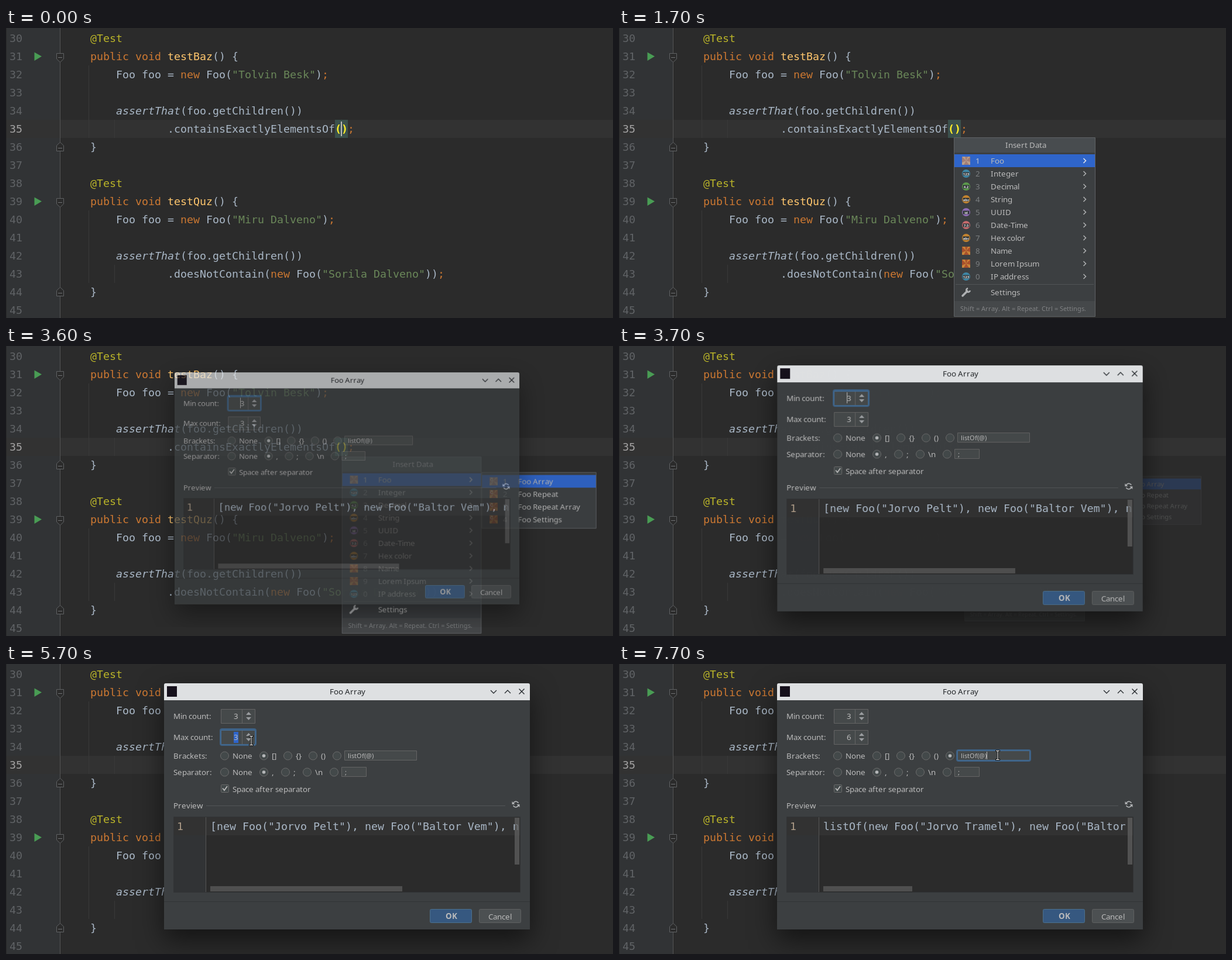
These frames come from a looping animation (1037x496 px, 8 s). An HTML page with a canvas:

```html
<!DOCTYPE html>
<html lang="en">
<head>
<meta charset="utf-8">
<title>Insert data</title>
<style>
  html, body { margin: 0; width: 100%; height: 100%; overflow: hidden; background: #2b2b2b; }
  canvas { display: block; width: 1037px; height: 496px; }
</style>
</head>
<body>
<canvas id="stage" width="1037" height="496"></canvas>
<script>
const W = 1037, H = 496, LOOP = 8000, STEP = 100;
const stage = document.getElementById('stage').getContext('2d');
const sheet = document.createElement('canvas');
sheet.width = W;
sheet.height = H;
const sheetCtx = sheet.getContext('2d');
let g = stage;

const MONO = '18.27px "DejaVu Sans Mono", monospace';
const UI = '13.33px "Noto Sans", sans-serif';
const SMALL = '11px "Noto Sans", sans-serif';
const CELL = 11, ROW = 31, CODE_X = 100;
const TEXT = '#a9b7c6', LABEL = '#bbbbbb', PANEL = '#3c3f41', BLUE = '#2f65ca';

const CODE = [
  '    @Test',
  '    public void testBaz() {',
  '        Foo foo = new Foo("Tolvin Besk");',
  '',
  '        assertThat(foo.getChildren())',
  '                .containsExactlyElementsOf  ;',
  '    }',
  '',
  '    @Test',
  '    public void testQuz() {',
  '        Foo foo = new Foo("Miru Dalveno");',
  '',
  '        assertThat(foo.getChildren())',
  '                .doesNotContain(new Foo("Sorila Dalveno"));',
  '    }',
  ''
];

const MENU = [
  ['Foo', 'tile'], ['Integer', '#3f87a6', '123'], ['Decimal', '#5c9a4c', '4.2'],
  ['String', '#c4842f', 'abc'], ['UUID', '#8f6cb5', 'id'], ['Date-Time', '#c66a6c', '7:3'],
  ['Hex color', '#c4842f', 'abc'], ['Name', 'tile'], ['Lorem Ipsum', 'tile'], ['IP address', '#3f87a6', '123']
];
const SUBMENU = ['Foo Array', 'Foo Repeat', 'Foo Repeat Array', 'Foo Settings'];

const PREVIEWS = {
  three: '[new Foo("Jorvo Pelt"), new Foo("Baltor Vem"), n',
  six: '[new Foo("Jorvo Tramel"), new Foo("Baltor Quemen',
  list: 'listOf(new Foo("Jorvo Tramel"), new Foo("Baltor'
};

// Pointer keys: time, x, y
const POINTER = [
  [4100, 616, 234], [4200, 611, 194], [4300, 600, 149], [4600, 492, 124], [4900, 416, 116],
  [5100, 408, 125], [5300, 419, 131], [6400, 419, 131], [6700, 480, 140], [7100, 610, 153],
  [7400, 642, 157], [7600, 647, 156]
];

const clamp = v => Math.min(1, Math.max(0, v));
const easeOut = p => 1 - (1 - p) ** 3;
const progress = (t, start) => clamp((t - start) / 200);

function rect(x, y, w, h, fill) {
  g.fillStyle = fill;
  g.fillRect(x, y, w, h);
}

function box(x, y, w, h, fill, border, r = 0, line = 1) {
  g.beginPath();
  g.roundRect(x + line / 2, y + line / 2, w - line, h - line, r);
  g.fillStyle = fill;
  g.fill();
  g.strokeStyle = border;
  g.lineWidth = line;
  g.stroke();
}

function path(points, stroke, line = 1, fill) {
  g.beginPath();
  for (let i = 0; i < points.length; i += 2) g.lineTo(points[i], points[i + 1]);
  if (fill) {
    g.closePath();
    g.fillStyle = fill;
    g.fill();
  }
  if (stroke) {
    g.strokeStyle = stroke;
    g.lineWidth = line;
    g.stroke();
  }
}

function disc(x, y, r, fill) {
  g.beginPath();
  g.arc(x, y, r, 0, 7);
  g.fillStyle = fill;
  g.fill();
}

// Interface text sits on whole-pixel advances
function label(text, x, y, color = LABEL, font = UI) {
  g.font = font;
  g.fillStyle = color;
  for (const ch of text) {
    g.fillText(ch, x, y);
    x += Math.round(g.measureText(ch).width);
  }
}

function mono(text, x, y, color, style = '') {
  g.font = style + MONO;
  g.fillStyle = color;
  g.fillText(text, x, y);
}

function tokenStyle(token) {
  if (token[0] === '@') return ['#bbb529'];
  if (token[0] === '"') return ['#6a8759'];
  if (/^(public|void|new|;)$/.test(token)) return ['#cc7832'];
  if (token.startsWith('test')) return ['#ffc66d'];
  return [TEXT, token === 'assertThat' ? 'italic ' : ''];
}

function foldMark(cy, dir) {
  const tip = cy + 8 * dir, side = cy + 2.5 * dir, end = cy - 7 * dir;
  path([86.5, end, 98.5, end, 98.5, side, 92.5, tip, 86.5, side, 86.5, end], '#606264', 1, '#2b2b2b');
  rect(89, Math.round(cy - dir), 7, 1, '#707274');
}

function editor(t) {
  rect(0, 0, W, H, '#2b2b2b');
  rect(0, 0, 92, H, '#313335');
  rect(0, 157, W, ROW, '#323232');
  rect(0, 0, 1, H, '#282828');
  rect(92, 0, 1, H, '#555555');
  for (const y of [64, 312]) {
    rect(141, y, 1, 124, '#393939');
    rect(185, y + 93, 1, ROW, '#393939');
  }
  CODE.forEach((line, i) => {
    const y = 24 + i * ROW;
    mono(String(30 + i), 6, y, i === 5 ? '#a4a3a3' : '#606366');
    for (const m of line.matchAll(/@\w+|"[^"]*"|\w+|[^\w@"\s]/g)) {
      mono(m[0], CODE_X + m.index * CELL, y, ...tokenStyle(m[0]));
    }
    if (line.includes('void')) {
      path([48.5, y - 13.5, 61, y - 6.5, 48.5, y + 1], null, 1, '#499c54');
      foldMark(y - 4.5, 1);
    }
    if (line.trim() === '}') foldMark(y - 6.5, -1);
  });
  rect(562, 157, 22, ROW, '#3b514d');
  mono('()', 562, 179, '#ffef28', 'bold ');
  if (t < 200 || (t >= 700 && t < 1200)) rect(572, 160, 2, 25, '#bbbbbb');
}

function tile(x, y, selected, badge) {
  rect(x - 7, y - 7, 14, 14, selected ? '#b9a08c' : '#c8853a');
  const dark = selected ? '#a37d75' : '#a8502c';
  path([x - 7, y - 7, x, y, x - 7, y + 3], null, 1, dark);
  path([x, y, x + 7, y - 7, x + 7, y + 2], null, 1, dark);
  path([x, y, x + 5, y + 7, x - 4, y + 7], null, 1, dark);
  path([x - 2, y - 7, x + 3, y - 7, x, y], null, 1, dark);
  if (badge) {
    g.beginPath();
    g.arc(x - 3, y - 3, 2.5, 0.5, 5.5);
    g.strokeStyle = '#e0d6cc';
    g.lineWidth = 1;
    g.stroke();
  }
}

function badgeIcon(x, y, color, text) {
  disc(x, y, 7, color);
  rect(x - 5.5, y - 2.5, 11, 6, '#2f3437');
  g.textAlign = 'center';
  g.font = 'bold 6px "Noto Sans", sans-serif';
  g.fillStyle = '#f0f0f0';
  g.fillText(text, x, y + 2.5);
  g.textAlign = 'left';
}

function wrench(x, y) {
  g.lineCap = 'round';
  path([x - 6, y + 6, x + 2, y - 2], '#afb1b3', 3.5);
  g.lineCap = 'butt';
  g.beginPath();
  g.arc(x + 3.5, y - 3.5, 3.2, 0.1, 4.6);
  g.strokeStyle = '#afb1b3';
  g.lineWidth = 2.6;
  g.stroke();
}

function menu() {
  box(572, 187, 242, 307, PANEL, '#5f6265');
  rect(573, 188, 240, 25, '#484c4f');
  label('Insert Data', 660, 205);
  rect(573, 216, 240, 22, BLUE);
  MENU.forEach(([name, icon, text], i) => {
    const y = 227 + i * 22;
    if (icon === 'tile') tile(593, y, i === 0);
    else badgeIcon(593, y, icon, text);
    label(String((i + 1) % 10), 609, y + 5, i ? '#7b7e80' : '#c0c4cc');
    label(name, 635, y + 5);
    path([793.5, y - 4, 797.5, y, 793.5, y + 4], i ? '#afb1b3' : '#e6e8ec', 1.5);
  });
  rect(575, 438, 236, 1, '#515456');
  wrench(593, 452);
  label('Settings', 635, 457);
  rect(573, 467, 240, 26, '#45484a');
  label('Shift = Array. Alt = Repeat. Ctrl = Settings.', 583, 484, '#808284', SMALL);
}

function submenu() {
  box(811, 215, 199, 98, PANEL, '#5f6265');
  rect(812, 220, 197, 22, BLUE);
  SUBMENU.forEach((name, i) => {
    const y = 231 + i * 22;
    tile(832, y, i === 0, true);
    label(String(i + 1), 848, y + 5, i ? '#7b7e80' : '#c0c4cc');
    label(name, 874, y + 5);
  });
}

function spinner(y, value, focused, selected, caretX) {
  if (focused) box(365, y - 3, 63, 30, '#3d6185', '#3d6185', 3);
  box(367, y, 59, 25, '#45494a', focused ? '#466d94' : '#646464');
  rect(403, y + 1, 1, 23, '#646464');
  path([410, y + 10, 414.5, y + 5, 419, y + 10], null, 1, '#9a9da0');
  path([410, y + 14, 414.5, y + 19, 419, y + 14], null, 1, '#9a9da0');
  if (selected) rect(389, y + 3, 8, 19, BLUE);
  label(value, 389, y + 17);
  if (caretX) rect(caretX, y + 2, 1, 19, '#bbbbbb');
}

function radio(x, y, on) {
  box(x - 7.5, y - 7.5, 15, 15, '#43494a', '#6b6b6b', 7);
  if (on) disc(x, y, 2.8, '#b4b6b8');
}

function radioRow(y, xs, texts, chosen) {
  xs.forEach((x, i) => {
    radio(x, y, i === chosen);
    if (texts[i]) label(texts[i], x + 13.5, y + 5);
  });
}

function refreshIcon(x, y) {
  g.strokeStyle = '#afb1b3';
  g.lineWidth = 1.7;
  for (const a of [0, Math.PI]) {
    g.beginPath();
    g.arc(x, y, 4.8, a + 0.35, a + 2.7);
    g.stroke();
  }
  path([x - 6.5, y - 5, x - 6.5, y, x - 1.5, y], null, 1, '#afb1b3');
  path([x + 6.5, y + 5, x + 6.5, y, x + 1.5, y], null, 1, '#afb1b3');
}

function preview(text, thumb) {
  box(286, 261, 593, 130, '#2b2b2b', '#323436');
  rect(287, 262, 54, 128, '#313335');
  rect(287, 262, 591, ROW, '#323232');
  rect(341, 262, 1, 128, '#555555');
  mono('1', 292, 284, '#ad9b87');
  g.save();
  g.beginPath();
  g.rect(342, 262, 536, 128);
  g.clip();
  mono(text, 349, 284, TEXT);
  g.restore();
  rect(869, 263, 8, 80, 'rgba(95,95,95,.75)');
  rect(349, 380, thumb, 9, '#4f4f4f');
}

function titleBar() {
  g.beginPath();
  g.roundRect(270, 33, 625, 29, [3, 3, 0, 0]);
  g.fillStyle = '#dee0e2';
  g.fill();
  rect(275, 38, 17, 18, '#16111c');
  label('Foo Array', 553, 52, '#232629');
  const ink = '#2b2f33';
  path([828, 45, 833, 50, 838, 45], ink, 1.4);
  path([852, 50, 857, 45, 862, 50], ink, 1.4);
  path([876.5, 42.5, 885.5, 51.5], ink, 1.4);
  path([885.5, 42.5, 876.5, 51.5], ink, 1.4);
}

function dialog(t) {
  const minFocus = t < 5200, maxFocus = !minFocus && t < 7300, listFocus = t >= 7300;
  const typed = t >= 6200, listMode = t >= 7400;
  const minCaret = minFocus && (t < 4100 || (t >= 4600 && t < 5100));
  const maxCaret = maxFocus && (t < 5700 || (typed && t < 6700) || t >= 7200);

  g.save();
  g.shadowColor = 'rgba(0,0,0,.55)';
  g.shadowBlur = 45;
  g.shadowOffsetY = 18;
  g.beginPath();
  g.roundRect(270, 33, 625, 421, [3, 3, 0, 0]);
  g.fillStyle = PANEL;
  g.fill();
  g.restore();
  titleBar();

  label('Min count:', 286, 94);
  label('Max count:', 286, 130);
  label('Brackets:', 286, 162);
  label('Separator:', 286, 190);
  spinner(77, '3', minFocus, false, minCaret && 389);
  spinner(113, typed ? '6' : '3', maxFocus, maxFocus && !typed, maxCaret && 397);

  radioRow(157, [373.5, 440.5, 481.5, 524.5, 565.5], ['None', '[]', '{}', '()'], listMode ? 4 : 1);
  if (listFocus) box(576, 146, 128, 21, '#3d6185', '#3d6185', 3);
  box(578, 148, 124, 17, '#45494a', listFocus ? '#466d94' : '#646464');
  label('listOf(@)', 584, 161, LABEL, SMALL);
  if (t >= 7500) rect(628, 150, 1, 13, '#bbbbbb');

  radioRow(185, [373.5, 440.5, 477.5, 514.5, 560.5], ['None', ',', ';', '\\n'], 1);
  box(573, 176, 43, 17, '#45494a', '#646464');
  label(';', 579, 189, LABEL, SMALL);

  box(367, 206, 14, 14, '#43494a', '#6b6b6b', 1);
  path([370, 212.5, 373, 216, 378, 209], '#bbbbbb', 1.8);
  label('Space after separator', 387, 219);

  label('Preview', 286, 247);
  rect(342, 242, 511, 1, '#515456');
  refreshIcon(871, 240);
  preview(PREVIEWS[listMode ? 'list' : listFocus ? 'six' : 'three'], listFocus ? 152 : 328);

  rect(270, 406, 625, 1, '#323537');
  box(724, 419, 72, 24, '#365880', '#4c708c', 2);
  label('OK', 751, 436, LABEL, 'bold ' + UI);
  box(808, 419, 72, 24, '#4c5052', '#5e6060', 2);
  label('Cancel', 824, 437);
}

function pointerAt(t) {
  const i = POINTER.findIndex(k => k[0] > t);
  if (i < 0) return POINTER.at(-1).slice(1);
  const [t0, x0, y0] = POINTER[i - 1], [t1, x1, y1] = POINTER[i];
  const p = (t - t0) / (t1 - t0);
  return [x0 + (x1 - x0) * p, y0 + (y1 - y0) * p];
}

function pointer(t) {
  const [px, py] = pointerAt(t);
  const x = Math.round(px), y = Math.round(py);
  const inList = x >= 578 && x < 702 && y >= 149 && y < 165 && t > 7000;
  if (inList || (t >= 5000 && t < 6200)) {
    const beam = [[-4, -9, 8, 3], [-4, 6, 8, 3], [-1.5, -9, 3, 18]];
    for (const [dx, dy, w, h] of beam) rect(x + dx, y + dy, w, h, '#111111');
    rect(x - 3, y - 8, 6, 1, '#ffffff');
    rect(x - 3, y + 7, 6, 1, '#ffffff');
    rect(x - 0.5, y - 8, 1, 16, '#ffffff');
    return;
  }
  const outline = [0, 0, 0, 16, 4, 13, 7, 19, 9.5, 18, 7, 12, 11, 11.5, 0, 0];
  path(outline.map((v, i) => v + (i % 2 ? y : x) + 0.5), '#ffffff', 1.2, '#17191b');
}

// Draws a window as one sheet, then fades and scales it about its centre
function windowLayer(draw, cx, cy, amount) {
  if (amount <= 0) return;
  g = sheetCtx;
  g.clearRect(0, 0, W, H);
  draw();
  g = stage;
  const scale = 0.8 + 0.2 * amount;
  g.save();
  g.globalAlpha = amount;
  g.translate(cx, cy);
  g.scale(scale, scale);
  g.drawImage(sheet, -cx, -cy);
  g.restore();
}

function render(t) {
  editor(t);
  const closing = 1 - progress(t, 3518) ** 3;
  const opened = start => t < 3600 ? easeOut(progress(t, start)) : closing;
  windowLayer(menu, 693, 340.5, opened(1432));
  windowLayer(submenu, 910.5, 264, opened(2532));
  if (t >= 3600) windowLayer(() => dialog(t), 582.5, 243.5, easeOut(progress(t, 3532)));
  if (t >= 4100) pointer(t);
}

const begin = performance.now();
function tick() {
  const t = (performance.now() - begin) % LOOP;
  render(Math.floor(t / STEP) * STEP);
  requestAnimationFrame(tick);
}
tick();
</script>
</body>
</html>
```
